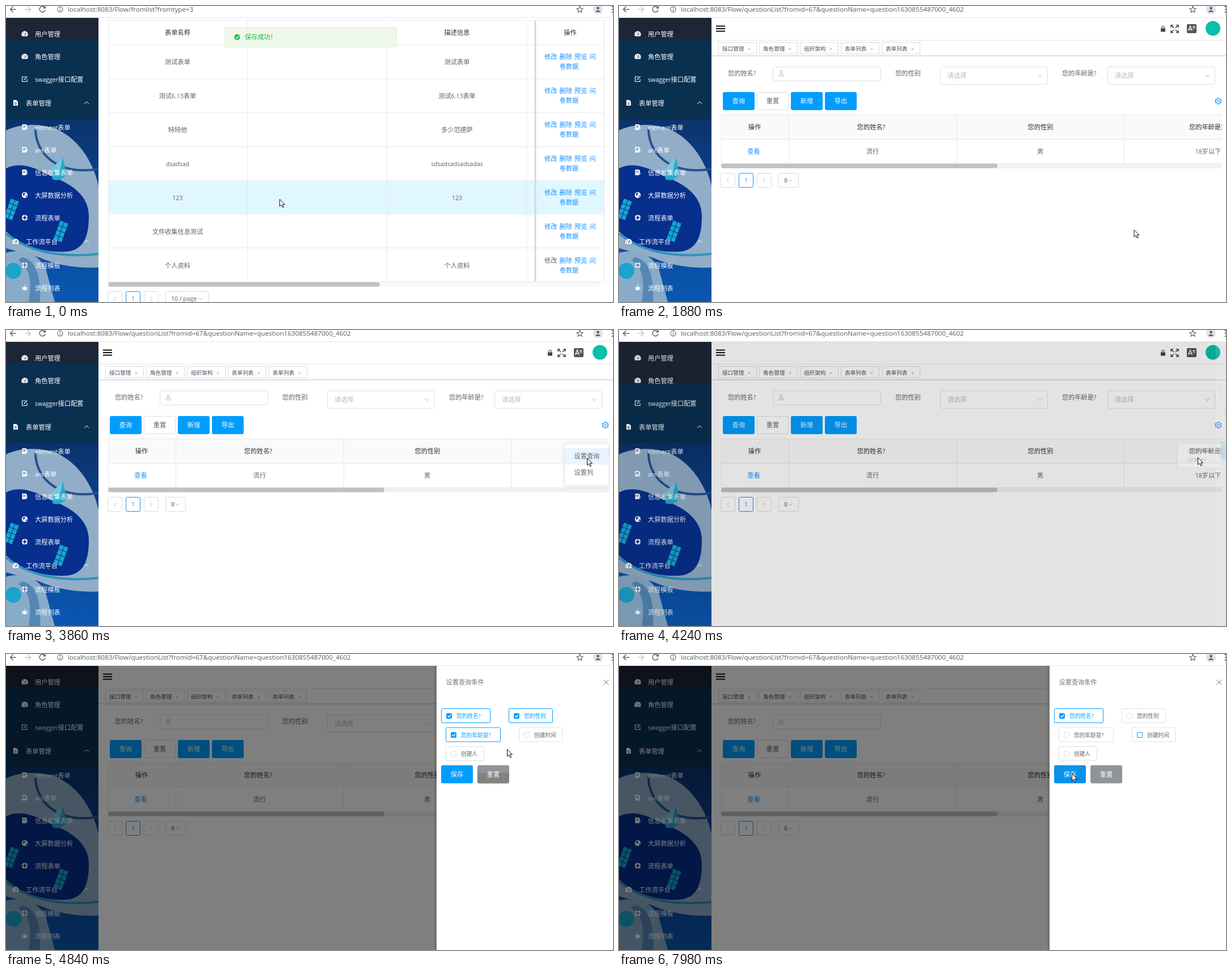
These frames come from a looping animation (1070x523 px, 8 s). An HTML page:

```html
<!DOCTYPE html>
<html lang="zh">
<head>
<meta charset="utf-8">
<style>
html, body { margin: 0; width: 100%; height: 100%; overflow: hidden; background: #fff; }
svg { display: block; width: 1070px; height: 523px; font-family: 'Open Sans', 'Noto Sans CJK SC', 'Noto Sans CJK', sans-serif; }
</style>
</head>
<body>
<svg id="stage" viewBox="0 0 1070 523" xmlns="http://www.w3.org/2000/svg"></svg>
<script>
const BLUE = '#1890ff', BTN = '#009dff', LINE = '#e6e8ea', INK = '#2b2d30', GREY = '#606266', HOVER = '#e0f7ff';
const $ = id => document.getElementById(id);

// Latin runs are set slightly smaller than the Chinese glyphs around them.
const text = (x, y, s, fill = GREY, anchor = 'start', size = 11.2, extra = '') =>
  `<text x="${x}" y="${y + size * .37}" fill="${fill}" font-size="${size}" text-anchor="${anchor}" ${extra}>` +
  s.replace(/[!-~]+( [!-~]+)*/g, m => `<tspan font-size="${size * .94}">${m}</tspan>`) + '</text>';
const mid = (x, y, s, fill, size) => text(x, y, s, fill, 'middle', size);
const white = (x, y, s, anchor) => text(x, y, s, '#fff', anchor, 11.2, 'font-weight="500"');
const rect = (x, y, w, h, fill, stroke = 'none', r = 0, extra = '') =>
  `<rect x="${x}" y="${y}" width="${w}" height="${h}" rx="${r}" fill="${fill}" stroke="${stroke}" ${extra}/>`;
const line = (d, stroke, w = 1, extra = '') =>
  `<path d="${d}" fill="none" stroke="${stroke}" stroke-width="${w}" ${extra}/>`;
const shape = (d, fill) => `<path d="${d}" fill="${fill}"/>`;
const disc = (x, y, r, fill, stroke = 'none', w = 1) =>
  `<circle cx="${x}" cy="${y}" r="${r}" fill="${fill}" stroke="${stroke}" stroke-width="${w}"/>`;
const group = (id, body, extra = '') => `<g id="${id}" ${extra}>${body}</g>`;
const at = (x, y, body) => `<g transform="translate(${x} ${y})">${body}</g>`;
const chevron = (x, y, dir = 1, c = '#b4b8be') => line(`M${x - 4} ${y - 2 * dir}L${x} ${y + 2 * dir}L${x + 4} ${y - 2 * dir}`, c);
const cross = (x, y, r, c, w = 1) => line(`M${x - r} ${y - r}l${2 * r} ${2 * r}m0 ${-2 * r}l${-2 * r} ${2 * r}`, c, w);

function browserBar() {
  return rect(0, 0, 1070, 21, '#fff') + rect(0, 20, 1070, 1, '#e2e4e6') +
    line('M18 6H8M12.5 1L7.5 6L12.5 11', '#5f6368', 1.5) +
    line('M33 6H43M38.500 1L43.500 6L38.500 11', '#c4c7ca', 1.5) +
    line('M68 2.500A5 5 0 1 0 69 7', '#5f6368', 1.5) + shape('M65 4.500H70V-.5Z', '#5f6368') +
    disc(95.5, 6, 4.6, 'none', '#5f6368', 1.1) + line('M95.500 5.500V8.500M95.500 3.300V4.400', '#5f6368', 1.1) +
    '<text id="url" x="109" y="10" font-size="11.6" fill="#55595e"></text>' +
    line('M1011.500 .5L1013 4.300L1017 4.600L1014 7.200L1015 11L1011.500 9L1008 11L1009 7.200L1006 4.600L1010 4.300Z', '#5f6368', 1.1) +
    disc(1043.5, 6, 8.5, '#dfe2e8') + disc(1043.5, 3.7, 2.3, '#4b566f') + shape('M1038.500 10.500Q1043.500 4.500 1048.500 10.500Z', '#4b566f') +
    [1, 6, 11].map(y => disc(1069, y, 1.2, '#5f6368')).join('');
}

const icons = {
  gauge: shape('M-4.500 4.500A5.700 5.700 0 1 1 4.500 4.500Z', '#fff') + line('M0 3L1.500 -2M-4 1h1.300M2.700 1h1.300M-2.500 -2.500l.8 .8', '#12304c', 1.1),
  edit: line('M2 -4H-4.500V4.500H4V0M-1.500 1.500L4.500 -4.500', '#fff', 1.1),
  file: shape('M-4 -5H1L4 -2V5H-4Z', '#fff') + line('M-2 0H2M-2 2.500H2', '#12304c'),
  form: shape('M-4.500 -5H2L4 -3V0L0 5H-4.500Z', '#fff') + line('M-3 -2H2M-3 0H1', '#2c5a8c') + line('M1 5L5 1', '#fff', 1.5),
  globe: disc(0, 0, 5.2, '#fff') + shape('M-3 -3L1 -4L0 0L-3 1ZM1 2L4 0L3 4Z', '#123f8c'),
  ring: disc(0, 0, 3.8, 'none', '#fff', 2.8) + line('M-5 0H-2.500M2.500 0H5M0 -5V-2.500M0 2.500V5', '#17407f', 1.2),
  bug: `<ellipse cy="1" rx="2.600" ry="3.600" fill="#fff"/>` + line('M-5 -2L5 4M5 -2L-5 4M-5 1H5M-1.500 -4.500H1.500', '#fff')
};

function artwork() {
  const windows = (x, y) => {
    let s = '';
    for (let i = 0; i < 8; i++) s += rect((i % 2) * 8 - 8, (i >> 1) * 9 - 18, 7, 8, '#18a6cc');
    return `<g transform="translate(${x} ${y}) rotate(20)">${s}</g>`;
  };
  return rect(0, 200, 163, 323, 'url(#sky)') +
    shape('M0 220C25 207 68 206 98 222C135 243 156 284 163 318V462C128 464 88 458 58 444L0 428Z', '#91adc8') +
    shape('M0 287C22 275 50 284 76 299C112 313 146 332 146 372C146 412 134 432 106 434C66 436 26 424 0 398Z', '#062f8e') +
    line('M0 402C36 432 92 446 163 438', '#2c94bd', 4) +
    line('M52 217C52 262 92 300 163 288', '#24518f', 4) +
    shape('M79 289L100 267L107 298Q94 312 82 306Z', '#2ba8cd') + shape('M79 289L100 267L94 297Z', '#79c7df') +
    windows(10, 360) + windows(97, 399) +
    shape('M0 436C28 428 58 438 70 464L86 523H0Z', '#88abc9') +
    shape('M28 444C52 448 62 474 60 523H40C46 486 42 462 22 449Z', '#5487b5') +
    disc(13, 468, 14, '#1ba3cc');
}

function sidebar() {
  const items = [
    [50, 'gauge', '用户管理'], [90, 'gauge', '角色管理'], [130, 'edit', 'swagger接口配置'], [172, 'file', '表单管理', 1],
    [215, 'form', 'element表单'], [255, 'form', 'ant表单'], [295, 'form', '信息收集表单'], [335, 'globe', '大屏数据分析'],
    [375, 'ring', '流程表单'], [417, 'gauge', '工作流平台', 1], [459, 'ring', '流程模板'], [499, 'bug', '流程列表']
  ];
  return rect(0, 21, 163, 180, '#0a3050') + rect(0, 21, 163, 37, '#1c2637', 'none', 0, 'id="menuTop"') + artwork() +
    items.map(([y, icon, label, top]) =>
      at(top ? 17 : 33, y - 1, icons[icon]) + white(top ? 35 : 51, y, label) + (top ? chevron(142, y - 1, -1, '#fff') : '')
    ).join('');
}

function pager(y, label, w) {
  const box = (x, c) => rect(x + .5, y + .5, 25, 25, '#fff', c, 2);
  return box(179, '#d9dcdf') + box(211, BLUE) + box(243, '#d9dcdf') + rect(281.5, y + .5, w, 25, '#fff', '#d9dcdf', 2) +
    line(`M194 ${y + 10}l-4 3.500l4 3.500M254 ${y + 10}l4 3.500l-4 3.500`, '#bfc3c7') +
    mid(224, y + 13, '1', BLUE) + text(291, y + 13, label) + chevron(281 + w - 14, y + 13);
}

function listPage() {
  const rows = [['测试表单', '测试表单'], ['测试6.13表单', '测试6.13表单'], ['特特他', '多少范德萨'], ['dsadsad', 'sdsadsadsadsadas'],
    ['123', '123'], ['文件收集信息测试', ''], ['个人资料', '个人资料']];
  const top = i => 68 + i * 59.9;
  let grid = 'M180 25.500H1054';
  for (let i = 0; i < 8; i++) grid += `M180 ${Math.round(top(i)) + .5}H1054`;
  return rect(163, 21, 907, 502, '#fff') + rect(180, 0, 874, 59, HOVER, 'none', 0, 'id="rowHover"') +
    line(grid + [180, 425, 671, 917].map(x => `M${x}.5 25V488`).join(''), LINE) +
    mid(302.5, 47, '表单名称', INK) + mid(795, 47, '描述信息', INK) +
    rect(931.5, 26, 3, 461, '#d5d8da') + line('M1054.500 25V488', LINE) + mid(994.5, 47, '操作', INK) +
    rows.map(([name, info], i) => {
      const y = top(i) + 31;
      return mid(302.5, y, name) + mid(795, y, info) +
        ['修改', '删除', '预览', '问'].map((s, k) => text(949 + k * 26.5, y - 9, s, i == 6 && !k ? '#5c6b78' : BLUE)).join('') +
        mid(992.5, y + 8, '卷数据', BLUE);
    }).join('') +
    rect(658, 488, 388, 7, '#f8f8f8') + rect(180, 488, 479, 8, '#c1c1c1', 'none', 4) + pager(504, '10 / page', 76) +
    rect(385.5, 37.5, 303, 35, '#eef8eb', '#dcf0d6', 3) + disc(407.5, 55, 5, '#22b83e') +
    line('M405 55L407 57L410.500 53', '#fff', 1.2) + text(421, 55, '保存成功！', '#22b83e');
}

function header() {
  const tabs = ['接口管理', '角色管理', '组织架构', '表单列表', '表单列表'];
  return rect(163, 21, 907, 502, '#fff') + line('M171 35.500H187M171 40H187M171 44.500H187', '#111', 2) +
    rect(955, 39.5, 8, 6, '#444') + line('M957 40V37.500A2 2 0 0 1 961 37.500V40', '#444', 1.2) +
    line('M973 38V34H977M973 34L978 39M982 34H986V38M986 34L981 39M973 43V47H977M973 47L978 42M986 43V47H982M986 47L981 42', '#444', 1.5) +
    rect(1001, 32, 17, 16, '#505357', 'none', 2) + line('M1003.500 44L1007 35L1010.500 44M1005 41.500H1009', '#fff', 1.3) +
    line('M1011 36.500H1016M1013.500 35V36.500M1015.500 37L1011.500 41M1011.500 37L1015.500 41', '#fff', .9) +
    disc(1047, 39.5, 13, '#08bfaa') + line('M163 60.500H1070', '#e4e6e9') +
    tabs.map((s, i) => rect(175.5 + i * 72, 64.5, 67, 20, '#fff', '#d8dce5') + text(182 + i * 72, 75, s, '#495060', 'start', 9.6) +
      cross(229.5 + i * 72, 76, 1.7, '#8b9099', .8)).join('') +
    line('M163 88H1070', '#d2d5d9', 1.5);
}

function queryPage() {
  const select = x => rect(x + .5, 107.5, 189, 31, '#fff', '#dcdfe6', 3) + text(x + 13, 123, '请选择', '#b8bcc4') + chevron(x + 176, 123);
  const button = (i, s) => rect(183 + i * 60, 152, 56, 32, BTN, 'none', 3) + white(211 + i * 60, 168, s, 'middle');
  const spokes = [0, 60, 120, 180, 240, 300].map(a => `<path d="M-2 -4.600L0 -5.600L2 -4.600" transform="rotate(${a})"/>`).join('');
  return text(192, 119, '您的姓名?') + rect(271.5, 107.5, 190, 25, '#fff', '#dcdfe6', 3) +
    disc(286, 116.5, 2.2, 'none', '#b8bcc4') + line('M282 123.500C282 118.500 290 118.500 290 123.500Z', '#b8bcc4') +
    group('sexField', text(487, 119, '您的性别') + select(566)) + text(781, 119, '您的年龄是?') + select(861) +
    button(0, '查询') + button(2, '新增') + button(3, '导出') +
    rect(243.5, 152.5, 55, 31, '#fff', '#dcdfe6', 3) + mid(271, 168, '重置') +
    at(1056.5, 168, disc(0, 0, 4.5, 'none', BLUE) + disc(0, 0, 1.8, 'none', BLUE) + `<g fill="none" stroke="${BLUE}">${spokes}</g>`) +
    `<g clip-path="url(#tableClip)">` + rect(180, 192, 890, 43, '#fafafa') + rect(180, 235, 890, 43, '#fff', 'none', 0, 'id="resultRow"') +
    line('M180 192.500H1070M180 235.500H1070M180 278.500H1070M180.500 192V278M299.500 192V278M595.500 192V278M890.500 192V278', LINE) +
    mid(239, 214, '操作', INK) + mid(444.5, 214, '您的姓名?', INK) + mid(743, 214, '您的性别', INK) + text(1005, 214, '您的年龄是?', INK) +
    mid(237.5, 257, '查看', BLUE) + mid(447, 257, '流行') + mid(742.5, 257, '男') + mid(1038.5, 257, '18岁以下') +
    rect(180, 278.5, 890, 8.5, '#f1f1f1') + rect(180, 278.5, 487, 8, '#c1c1c1', 'none', 4) + '</g>' + pager(295, '8', 35);
}

const boxes = [[767, 96, 87, '您的姓名?'], [886, 96, 78, '您的性别'], [775, 129.5, 97, '您的年龄是?'], [904, 129.5, 77, '创建时间'], [775, 163, 68, '创建人']];

function drawer() {
  return rect(755, 21, 4, 502, 'rgba(0,0,0,.1)') + rect(759, 21, 311, 502, '#fff') + text(775.5, 50, '设置查询条件', '#72767b') + cross(1058, 50, 4.5, '#72767b') +
    boxes.map(([x, y, w, s], i) => rect(x + .5, y + .5, w - 1, 25, '#fff', '', 2, `id="frame${i}"`) +
      rect(x + 9.5, y + 9, 9, 9, '#fff', '', 1.5, `id="box${i}"`) +
      line(`M${x + 11.5} ${y + 13.5}l2 2l3.500 -4`, '#fff', 1.2) + text(x + 27, y + 13.5, s, GREY, 'start', 9.7, `id="label${i}"`)).join('') +
    rect(767, 196.5, 56, 32, BTN, 'none', 3, 'id="save"') + white(795, 212.5, '保存', 'middle') +
    rect(831, 196.5, 56, 32, '#909399', 'none', 3) + group('resetShade', shape('M831 210H887V225.500Q887 228.500 884 228.500H834Q831 228.500 831 225.500Z', '#828282')) +
    white(859, 212.5, '重置', 'middle');
}

function menu() {
  return rect(985, 201, 77, 73.6, '#fff', '#e6e9ef', 3, 'filter="url(#soft)"') + rect(985.5, 209, 76, 28.8, '#e8f4ff', 'none', 0, 'id="menuHover"') +
    text(1001.5, 223, '设置查询') + text(1001.5, 252, '设置列');
}

$('stage').innerHTML = `<defs>
  <linearGradient id="sky" x2="0" y2="1"><stop stop-color="#0b336c"/><stop offset=".4" stop-color="#0b428f"/><stop offset="1" stop-color="#0a57b2"/></linearGradient>
  <clipPath id="tableClip"><rect x="179" y="190" width="884" height="98"/></clipPath>
  <clipPath id="pageClip"><rect y="21" width="1070" height="502"/></clipPath>
  <filter id="soft" x="-20%" y="-20%" width="140%" height="140%"><feDropShadow dx="0" dy="1" stdDeviation="3" flood-opacity=".14"/></filter>
</defs>` + sidebar() + group('listPage', listPage()) + group('newPage', header() + group('content', queryPage())) +
  rect(0, 21, 1070, 502, '#000', 'none', 0, 'id="shade"') + `<g clip-path="url(#pageClip)">${group('drawer', drawer())}</g>` +
  group('menu', menu()) + browserBar() +
  group('cursor', `<path d="M.5 .5V13L3.500 10.300L5.700 15L7.700 14L5.600 9.600H9.500Z" fill="#fff" stroke="#111" stroke-linejoin="round"/>`);

// Moments at which the screen refreshes: start, count, spacing.
const ticks = [[0, 1, 0], [250, 1, 0], [400, 1, 0], [540, 10, 120], [1760, 5, 120], [2480, 1, 0], [2630, 2, 120], [2890, 3, 120],
  [3380, 5, 120], [4240, 7, 120], [5100, 1, 0], [5360, 3, 120], [5750, 2, 130], [6030, 1, 0], [6180, 1, 0], [6330, 2, 120],
  [6600, 1, 0], [6870, 1, 0], [7020, 1, 0], [7170, 1, 0], [7320, 2, 120], [7590, 4, 130]]
  .flatMap(([start, n, gap]) => Array.from({ length: n }, (_, i) => start + i * gap));

const trail = [[0, 482, 341], [250, 470, 410], [400, 768, 452], [540, 880, 456], [900, 1012, 440], [1260, 995, 468], [1620, 995, 468],
  [1760, 975, 440], [2000, 840, 350], [2240, 669, 264], [2480, 695, 263], [2630, 1003, 200], [2750, 1030, 184], [3130, 1053, 170],
  [3380, 1053, 172], [3860, 1024, 226], [4240, 1020, 225], [4480, 1000, 212], [4840, 883, 168], [4960, 949, 141], [5100, 950, 141],
  [5360, 940, 146], [5600, 841, 162], [5880, 822, 141], [6180, 818, 140], [6450, 889, 112], [6600, 898, 106],
  [6870, 936, 148], [7020, 939, 141], [7320, 939, 143], [7440, 900, 172], [7980, 798, 211]];

function pointer(t) {
  const i = trail.findIndex(p => p[0] > t);
  if (i < 0) return trail[trail.length - 1].slice(1);
  const [t0, x0, y0] = trail[i - 1], [t1, x1, y1] = trail[i], k = (t - t0) / (t1 - t0);
  return [x0 + (x1 - x0) * k, y0 + (y1 - y0) * k];
}

const set = (id, attrs) => { for (const k in attrs) $(id).setAttribute(k, attrs[k]); };
const show = (id, on) => set(id, { display: on ? 'inline' : 'none' });

function render(t) {
  const [x, y] = pointer(t), between = (a, b) => t >= a && t < b;
  set('cursor', { transform: `translate(${x} ${y})` });
  $('url').textContent = 'localhost:8083/Flow/' + (t < 1380 ? 'fromlist?fromtype=3' : 'questionList?fromid=67&questionName=question1630855487000_4602');

  show('listPage', t < 1620);
  show('newPage', t >= 1620);
  set('rowHover', { y: t < 400 ? 308 : 428 });
  set('content', t < 1760 ? { opacity: .4, transform: 'translate(-12 0)' } : { opacity: 1, transform: '' });
  set('resultRow', { fill: between(2240, 2750) ? HOVER : '#fff' });
  set('menuTop', { height: between(4240, 4360) ? 73 : 37 });
  show('sexField', t < 6870);

  const open = t < 3500 ? .5 : t < 4240 ? 1 : .57;
  show('menu', between(3380, 4360));
  set('menu', { opacity: t < 3500 ? .5 : t < 4240 ? 1 : .25, transform: `translate(0 ${201 * (1 - open)}) scale(1 ${open})` });
  show('menuHover', between(3740, 4240));

  const slide = 1 - (1 - Math.min(1, Math.max(0, (t - 4231) / 450))) ** 3;
  const fade = t < 4240 ? 0 : Math.min(1, .16 + slide);
  set('shade', { opacity: fade * .5 });
  set('drawer', { opacity: Math.min(1, slide * 2), transform: `translate(${311 * (1 - slide)} 0)` });

  const checked = [true, t < 6870, t < 6180, between(5360, 7320), false];
  const focus = t < 5360 ? -1 : t < 6180 ? 3 : t < 6870 ? 2 : t < 7320 ? 1 : 3;
  boxes.forEach(([bx, by, w], i) => {
    const on = checked[i], over = x > bx && x < bx + w && y > by && y < by + 26;
    const fading = i == 1 && between(6870, 7020);
    set('frame' + i, { stroke: on ? BTN : '#dcdfe6' });
    set('box' + i, { fill: on ? BTN : fading ? '#9fd6fb' : '#fff', stroke: on || over || focus == i ? BTN : '#dcdfe6' });
    set('label' + i, { fill: on ? BTN : GREY });
  });
  set('save', { fill: x < 823 && t > 7500 ? '#0a91e8' : BTN });
  show('resetShade', t < 7590);
}

const begin = performance.now();
let last = -1;
function loop(now) {
  const t = Math.max(0, now - begin) % 8000, tick = ticks.filter(v => v <= t).pop();
  if (tick !== last) render(last = tick);
  requestAnimationFrame(loop);
}
loop(begin);
</script>
</body>
</html>
```
